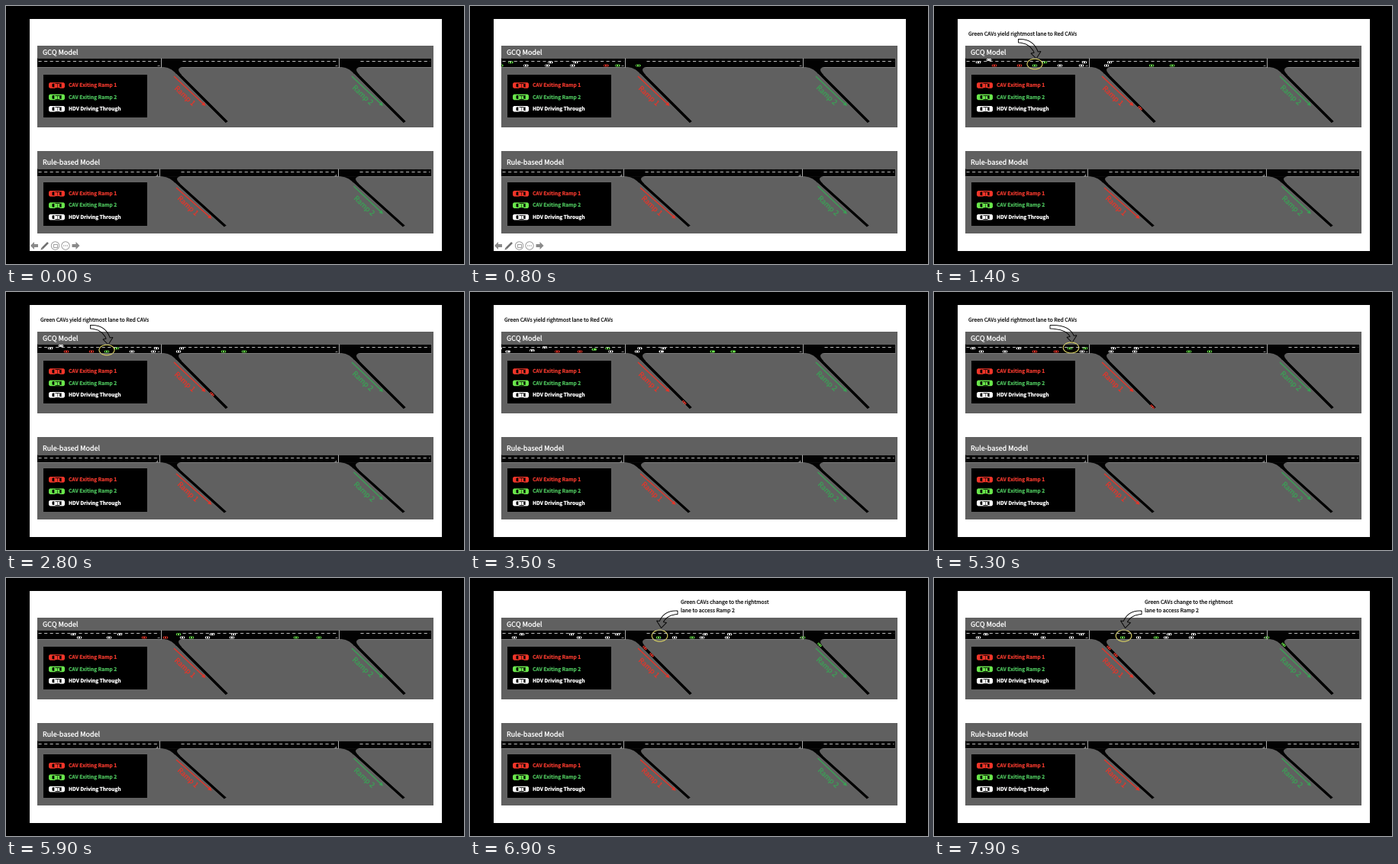
Recreate the animation shown at these times as a matplotlib script. Size 600 by 338 pixels, loop 8000 ms.

```python
import numpy as np
import matplotlib.pyplot as plt
from matplotlib.animation import FuncAnimation
from matplotlib.collections import PolyCollection
from matplotlib.patches import Circle, Ellipse, FancyBboxPatch, PathPatch, Polygon, Rectangle
from matplotlib.path import Path

W, H, DPI = 600, 338, 100
FRAMES, STEP = 80, 100
PX = 72 / DPI  # points per pixel
RED, GREEN, WHITE = "#f03529", "#69e64b", "#ffffff"
TEXT_RED, TEXT_GREEN, RAMP_GREEN = "#e3352a", "#48b857", "#3aa055"
GREY, ROAD, EDGE = "#606060", "#020202", "#9a9a9a"

plt.rcParams["font.family"] = ["Noto Sans CJK JP", "Liberation Sans"]
plt.rcParams["text.hinting"] = "none"

fig = plt.figure(figsize=(W / DPI, H / DPI), dpi=DPI, facecolor="black")
ax = fig.add_axes([0, 0, 1, 1])
ax.set(xlim=(0, W), ylim=(H, 0))
ax.axis("off")


def rect(x0, y0, x1, y1, color, **kw):
    return ax.add_patch(Rectangle((x0, y0), x1 - x0, y1 - y0, fc=color, lw=0, **kw))


def poly(points, color):
    return ax.add_patch(Polygon(points, fc=color, lw=0))


def line(xs, ys, color, width, **kw):
    kw.setdefault("solid_capstyle", "butt")
    return ax.plot(xs, ys, color=color, lw=width * PX, **kw)[0]


def text(x, y, s, size, color, **kw):
    kw.setdefault("va", "baseline")
    return ax.text(x, y, s, fontsize=size * PX, color=color, **kw)


def curve(points, codes, **kw):
    kinds = {"M": Path.MOVETO, "L": Path.LINETO, "Q": Path.CURVE3}
    path = Path(points, [kinds[c] for c in codes])
    return ax.add_patch(PathPatch(path, **kw))


def arrow(x0, y0, x1, y1, color):
    d = np.array([x1 - x0, y1 - y0]) / np.hypot(x1 - x0, y1 - y0)
    n = np.array([-d[1], d[0]])
    tip = np.array([x1, y1])
    base = tip - 5 * d
    line([x0, base[0]], [y0, base[1]], color, 1.4)
    poly([tip, base + 2.6 * n, base - 2.6 * n], color)


def icon(x, y, color):
    ax.add_patch(FancyBboxPatch((x + 2, y - 1.8), 17, 3.6, fc=color, lw=0,
                                boxstyle="round,pad=2,rounding_size=2.4"))
    for a, b in ((4.5, 7.3), (14.2, 16.6)):
        poly([(x + a, y - 2), (x + b, y - 2.6), (x + b, y + 2.6), (x + a, y + 2)], "black")
    line([x + 10.8] * 2, [y - 2.6, y + 2.6], "black", 0.5)
    for dy in (-2.8, 2.8):
        line([x + 8, x + 13.5], [y + dy] * 2, "black", 0.8)


def ramp(bx, by, drop):
    """Exit ramp leaving the road at its lower edge and falling by drop."""
    k = drop / 75
    pts = [(0, 0), (13, 0), (20, 9.5), (84.5, 75), (88, 72.5), (27, 10.5),
           (19, 3), (27, 0)]
    pts = [(bx + x, by + y * k) for x, y in pts]
    curve(pts, "MQQLLLQQ", fc=ROAD, lw=0)
    for a, b in ((2, 3), (5, 4)):
        line(*zip(pts[a], pts[b]), "#858585", 0.4)


def panel(top, bottom, title, title_y, road, stops, drop, legend_y):
    y0, y1, dash_y = road
    rect(41, top, 560, bottom, GREY)
    text(48.3, title_y, title, 9, WHITE)
    for bx in stops:
        ramp(bx, y1 - 0.3, drop)
    rect(41, y0, 557, y1, ROAD)
    line([41, 557], [y0, y0], EDGE, 0.6)
    a, b = stops
    for x0, x1 in ((41, a), (a + 27, b), (b + 27, 557)):
        line([x0, x1], [y1, y1], EDGE, 0.5)
        line([x0 + 1, x1 - 2], [dash_y] * 2, "#d0d0d0", 0.9,
             dashes=(4.6, 3.8), dash_capstyle="butt")
    for bx in stops:
        line([bx, bx], [y0, y1], "#bcbcbc", 0.9)
        line([bx - 5, bx - 2], [y1 - 1.6] * 2, "#b0b0b0", 0.7)
        line([bx - 3.5] * 2, [y1 - 3.2, y1 - 1.6], "#b0b0b0", 0.7)
    rect(49.3, legend_y - 14.5, 185, legend_y + 42.3, "black")
    rows = (("CAV Exiting Ramp 1", RED, TEXT_RED),
            ("CAV Exiting Ramp 2", GREEN, TEXT_GREEN),
            ("HDV Driving Through", WHITE, WHITE))
    for i, (label, color, ink) in enumerate(rows):
        y = legend_y + 15.4 * i
        icon(56, y, color)
        text(82, y + 2.5, label, 6.65, ink, weight="bold")


def ramp_label(x, y, s, color):
    text(x, y, s, 9.4, color, ha="center", va="center", rotation=-43, weight="light")


# slide and both road panels
rect(31, 17, 570.5, 321, "white")
panel(52.2, 158.8, "GCQ Model", 64.4, (68, 80, 72), (203, 436), 73.6, 104)
panel(190.2, 297.6, "Rule-based Model", 207.6, (213.2, 223.4, 217.2), (201, 435), 66.5, 245.8)
arrow(220, 92, 261.5, 131, TEXT_RED)
arrow(453, 92, 494, 131, RAMP_GREEN)
arrow(223, 238, 269.5, 278.7, TEXT_RED)
arrow(455.5, 236, 494, 272.5, RAMP_GREEN)
ramp_label(233, 117.5, "Ramp 1", TEXT_RED)
ramp_label(466, 117, "Ramp 2", RAMP_GREEN)
ramp_label(237, 261.5, "Ramp 1", TEXT_RED)
ramp_label(468.5, 261.5, "Ramp 2", RAMP_GREEN)


def controls():
    """Presenter buttons in the slide's lower left corner."""
    tool, pen = "#8a8a8a", "#707070"
    parts = []
    shape = [(-5, 0), (0, -5), (0, -2), (5, -2), (5, 2), (0, 2), (0, 5)]
    for x, d in ((37, 1), (91.5, -1)):
        parts.append(poly([(x + d * px, 314 + py) for px, py in shape], tool))
    parts.append(line([47.5, 55], [317.5, 310], pen, 2.6))
    parts.append(poly([(45.5, 319.5), (46.3, 316.6), (48.4, 318.7)], pen))
    for x in (64.5, 78):
        parts.append(ax.add_patch(Circle((x, 314), 5.2, fc="white", ec=tool, lw=0.8 * PX)))
    parts.append(ax.add_patch(Rectangle((61.8, 312), 5.4, 4, fc="none", ec=tool, lw=0.8 * PX)))
    for dx in (-2.3, 0, 2.3):
        parts.append(ax.add_patch(Circle((78 + dx, 314), 0.65, fc=tool, lw=0)))
    return parts


# Traffic: x at four key moments and the lane (top, middle, bottom) at each
LANE = {"t": 70.5, "m": 73.8, "b": 78}
THROUGH = [
    ((-57, -20, 13, 58), "bbbb"), ((-47, -10, 23, 68), "mmmm"),
    ((14, 51, 88, 133), "mmmm"), ((25, 62, 96, 143), "bbbb"),
    ((58, 93, 135, 180), "mbbb"), ((72, 111, 149, 193), "tmmm"),
    ((165, 194, 231, 268), "bbbb"), ((193, 232, 264, 304), "bbbb"),
    ((197, 235, 270, 308), "mmmm"), ((226, 263, 296, 337), "bbbb"),
    ((230, 265, 298, 340), "mmmm"),
]
EXIT_1 = [((79, 132, 181, 229), "bbbb"), ((112, 160, 209, 238), "bbbb"),
          ((270, 286, 310, 340), "bbbb")]
EXIT_2 = [((132, 178, 226, 247), "bmmb"), ((145, 198, 243, 291), "mmbb"),
          ((285, 334, 380, 436), "bbbb"), ((312, 361, 410, 458), "bbbb")]
CARS = ([(WHITE, None, *c) for c in THROUGH] + [(RED, 227, *c) for c in EXIT_1]
        + [(GREEN, 460, *c) for c in EXIT_2])

TIMES = [0, 1.2, 3.1, 3.7, 5.4, 5.9, 6.5]  # drive, hold, drive, hold, drive
ENTRY = 275
BODY = np.array([(-3.1, -0.8), (-2.5, -1.4), (2.5, -1.4), (3.1, -0.8),
                 (3.1, 0.8), (2.5, 1.4), (-2.5, 1.4), (-3.1, 0.8)])
WINDOWS = [np.array([(a, -0.9), (b, -0.9), (b, 0.9), (a, 0.9)])
           for a, b in ((-1.9, -0.9), (1, 1.8))]


def locate(t, exit_x, xs, lanes):
    a, b, c, d = xs
    x = np.interp(t, TIMES, [a - ENTRY, a, a, b, b, c, d])
    ya, yb, yc, yd = (LANE[k] for k in lanes)
    y = np.interp(t, TIMES, [ya, ya, ya, yb, yb, yc, yd])
    if exit_x:
        ramp_y = 89.5 + (x - exit_x) * 1.03
        if ramp_y > y:
            return x, ramp_y, np.radians(45)
    return x, y, 0


bodies = ax.add_collection(PolyCollection([], lw=0))
windows = ax.add_collection(PolyCollection([], lw=0, facecolors="black"))
clip = Rectangle((41, 52), 519, 101, transform=ax.transData)
for group in (bodies, windows):
    group.set_clip_path(clip)


def swoosh(x0, y0, x1, y1):
    """Tapered curved arrow from tail to tip."""
    s = 1 if x1 > x0 else -1
    pts = [(x0, y0), (x1 - 4 * s, y0 - 1), (x1 + 2.2 * s, y1 - 9),
           (x1 + 6 * s, y1 - 9.5), (x1, y1), (x1 - 7 * s, y1 - 7),
           (x1 - 2.8 * s, y1 - 7.8),
           (x1 - 8 * s, y0 + 5), (x0, y0 + 4.5), (x0, y0)]
    return curve(pts, "MQQLLLLQQL", fc="none", ec="black", lw=0.9 * PX)


def ring(x, y, w, h):
    return ax.add_patch(Ellipse((x, y), w, h, fc="none", ec="#dcd463", lw=1.1 * PX))


def note(x, y, s):
    return text(x, y, s, 6.92, "#1c1c1c", weight="light")


# (start, end, artists) in seconds
NOTES = [
    (0, 1.2, controls()),
    (1.2, 5.5, [note(44.8, 39.3, "Green CAVs yield rightmost lane to Red CAVs")]),
    (1.2, 3.1, [swoosh(110.5, 43.5, 134, 69), ring(132, 76, 20, 13.5)]),
    (3.7, 5.5, [swoosh(152, 43.5, 181, 66.3), ring(179.5, 73, 20.5, 14)]),
    (6.5, 9.0, [note(276, 34.4, "Green CAVs change to the rightmost"),
                note(276, 45.4, "lane to access Ramp 2"),
                swoosh(272, 43, 250.5, 65.5), ring(248.5, 75.7, 20.5, 15)]),
]


def draw(i):
    t = i * STEP / 1000
    body, glass, colors = [], [], []
    for color, exit_x, xs, lanes in CARS:
        x, y, turn = locate(t, exit_x, xs, lanes)
        c, s = np.cos(turn), np.sin(turn)
        spin = np.array([(c, s), (-s, c)])
        body.append(BODY @ spin + (x, y))
        glass += [w @ spin + (x, y) for w in WINDOWS]
        colors.append(color)
    bodies.set_verts(body)
    bodies.set_facecolor(colors)
    windows.set_verts(glass)
    for start, end, artists in NOTES:
        for art in artists:
            art.set_visible(start <= t < end)
    return bodies, windows


anim = FuncAnimation(fig, draw, frames=FRAMES, interval=STEP, repeat=True,
                     repeat_delay=0, blit=False)
plt.show()
```
